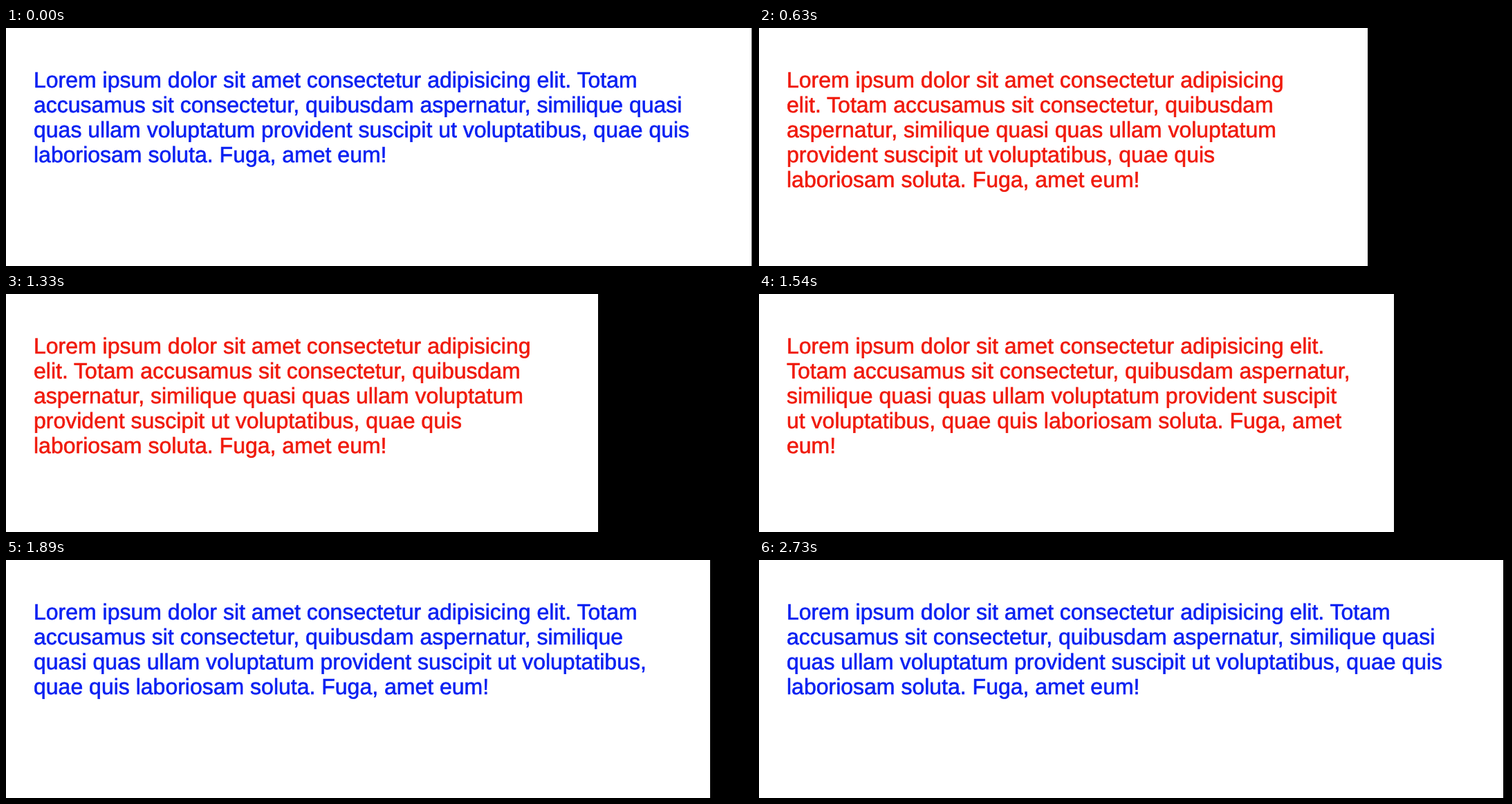
Animation, 1080 px wide and 344 px high, one loop 2.8 s. Source, as an HTML page:

```html
<!DOCTYPE html>
<html lang="en">
<head>
<meta charset="utf-8">
<title>Responsive paragraph</title>
<style>
  html, body {
    margin: 0;
    width: 1080px;
    height: 344px;
    overflow: hidden;
    background: #fff;
  }
  #text {
    position: absolute;
    left: 40px;
    top: 57px;
    margin: 0;
    font: 32px/36px "Liberation Sans", Arial, sans-serif;
    text-rendering: geometricPrecision;
    -webkit-text-stroke: 0.6px currentColor;
    color: #0a20f2;
  }
  #text.narrow { color: #f01a0c; }
  #desk {
    position: absolute;
    top: 0;
    right: 0;
    height: 344px;
    background: #000;
  }
</style>
</head>
<body>
<p id="text">Lorem ipsum dolor sit amet consectetur adipisicing elit. Totam accusamus sit consectetur, quibusdam aspernatur, similique quasi quas ullam voluptatum provident suscipit ut voluptatibus, quae quis laboriosam soluta. Fuga, amet eum!</p>
<div id="desk"></div>
<script>
  const LOOP = 2800, STEP = 70, STAGE = 1080;
  const LEFT = 40, RIGHT = 63.3, BREAKPOINT = 960;

  // Key points of the drag: time in ms, right edge of the window
  const keys = [
    [0, 1078], [350, 982], [630, 880], [910, 826], [1120, 823],
    [1540, 918], [1680, 968], [1890, 1018], [2240, 1068], [2730, 1076]
  ];
  const last = keys.length - 1;

  const text = document.getElementById("text");
  const desk = document.getElementById("desk");

  const slope = i => (keys[i + 1][1] - keys[i][1]) / (keys[i + 1][0] - keys[i][0]);

  // Harmonic mean of the neighbouring slopes: no overshoot
  function tangent(i) {
    if (i === 0) return slope(0);
    if (i === last) return 0;
    const a = slope(i - 1), b = slope(i);
    return a * b <= 0 ? 0 : 2 * a * b / (a + b);
  }

  function edgeAt(t) {
    let i = 0;
    while (i < last - 1 && t >= keys[i + 1][0]) i++;
    const [t0, x0] = keys[i], [t1, x1] = keys[i + 1];
    const d = t1 - t0, u = (t - t0) / d, v = 1 - u;
    return x0 * (1 + 2 * u) * v * v + x1 * u * u * (3 - 2 * u)
      + d * u * v * (tangent(i) * v - tangent(i + 1) * u);
  }

  function draw(t) {
    const edge = Math.round(edgeAt(Math.floor(t % LOOP / STEP) * STEP));
    text.style.width = edge - LEFT - RIGHT + "px";
    text.classList.toggle("narrow", edge <= BREAKPOINT);
    desk.style.width = STAGE - edge + "px";
  }

  const start = performance.now();
  function tick(now) {
    draw(Math.max(0, now - start));
    requestAnimationFrame(tick);
  }
  draw(0);
  requestAnimationFrame(tick);
</script>
</body>
</html>
```
